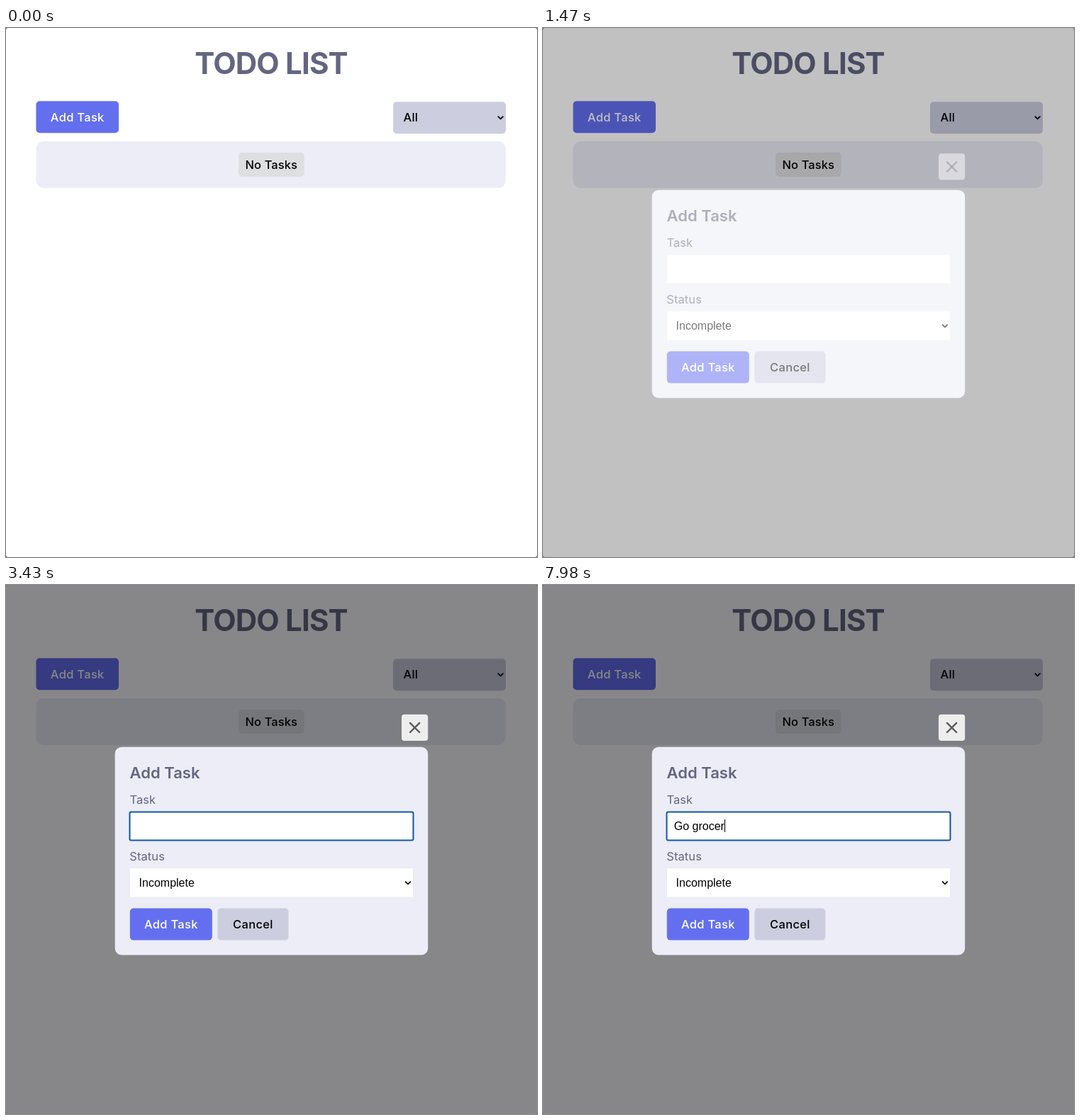
These frames come from a looping animation (749x747 px, 8 s). An HTML page with a canvas:

```html
<!DOCTYPE html>
<html lang="en">
<head>
<meta charset="utf-8">
<title>Todo list</title>
<style>
  html, body { margin: 0; width: 100%; height: 100%; overflow: hidden; background: #fff; }
  canvas { display: block; }
</style>
</head>
<body>
<canvas id="stage" width="749" height="747"></canvas>
<script>
const W = 749, H = 747, LOOP = 8000, STEP = 70;
const UI = 'Inter, "Noto Sans", sans-serif';
const FIELD = '"Liberation Sans", Arial, sans-serif';
const PURPLE = '#646ff0', SLATE = '#646681', PANEL = '#ecedf6', LILAC = '#cccdde';

const OPEN = 1308, FOCUS = 2450, BLINK = 1050, CARET_ON = 560;
const KEYS = [
  [6440, 'G'], [6650, 'o'], [6860, ' '], [7070, 'g'], [7280, 'r'],
  [7560, 'o'], [7630, 'c'], [7840, 'e'], [7980, 'r']
];

const stage = document.getElementById('stage').getContext('2d');

function makeLayer() {
  const c = document.createElement('canvas');
  c.width = W;
  c.height = H;
  return c.getContext('2d');
}
const page = makeLayer(), modal = makeLayer();

function box(g, x, y, w, h, r, fill) {
  g.fillStyle = fill;
  g.beginPath();
  g.roundRect(x, y, w, h, r);
  g.fill();
}

function text(g, str, x, y, font, fill, align = 'left', spacing = 0) {
  g.font = font;
  g.letterSpacing = spacing + 'px';
  g.textAlign = align;
  g.fillStyle = fill;
  g.fillText(str, x, y);
}

function line(g, points, color, width) {
  g.strokeStyle = color;
  g.lineWidth = width;
  g.lineCap = g.lineJoin = 'round';
  g.beginPath();
  points.forEach(([x, y], i) => i ? g.lineTo(x, y) : g.moveTo(x, y));
  g.stroke();
}

function chevron(g, x, y) {
  line(g, [[x - 3.3, y - 1.6], [x, y + 1.7], [x + 3.3, y - 1.6]], '#000', 1.8);
}

function button(g, label, x, y, w, fill, color) {
  box(g, x, y, w, 45, 5, fill);
  text(g, label, x + w / 2, y + 28.7, `500 16.5px ${UI}`, color, 'center', 0.3);
}

function drawPage(g) {
  g.fillStyle = '#fff';
  g.fillRect(0, 0, W, H);
  text(g, 'TODO LIST', 374, 65, `700 42px ${UI}`, SLATE, 'center', -0.8);
  button(g, 'Add Task', 42.4, 103.3, 116.6, PURPLE, '#fff');
  box(g, 546, 104.2, 159, 45, 5, LILAC);
  text(g, 'All', 560.5, 132, `500 16.5px ${UI}`, '#000', 'left', 0.2);
  chevron(g, 697.6, 126.7);
  box(g, 42.4, 160, 662.4, 66, 11, PANEL);
  box(g, 328, 176, 92.7, 34, 5, '#dedfe1');
  text(g, 'No Tasks', 374.3, 199, `500 16.5px ${UI}`, '#000', 'center', 0.1);
}

// Damped spring: stiffness 500, damping 25, mass 1
function spring(s) {
  const decay = 12.5, freq = Math.sqrt(500 - decay * decay);
  return Math.exp(-decay * s) * (Math.cos(freq * s) + decay / freq * Math.sin(freq * s));
}

function drawClose(g, t) {
  const y = 182.8 + 46 * spring((t - OPEN) / 1000);
  const cx = 576.6, cy = y + 18.6, d = 6.6;
  g.globalAlpha = Math.min(1, (t - OPEN) / 250);
  box(g, 558, y, 37.2, 37.2, 4, '#eee');
  line(g, [[cx - d, cy - d], [cx + d, cy + d]], '#585858', 2.4);
  line(g, [[cx + d, cy - d], [cx - d, cy + d]], '#585858', 2.4);
  g.globalAlpha = 1;
}

function drawField(g, t) {
  box(g, 175, 320.7, 399, 39.6, 0, '#fff');
  if (t < FOCUS) return;

  g.strokeStyle = '#1156a8';
  g.lineWidth = 2;
  g.beginPath();
  g.roundRect(174.5, 320.5, 400, 40, 2);
  g.stroke();

  const typed = KEYS.filter(([at]) => at <= t).map(([, ch]) => ch).join('');
  text(g, typed, 184.8, 345.7, `16px ${FIELD}`, '#000');
  if (typed || (t - FOCUS) % BLINK < CARET_ON) {
    const x = Math.round(185 + g.measureText(typed).width);
    g.fillStyle = '#000';
    g.fillRect(x, 331, 1, 18);
  }
}

function drawModal(g, t) {
  g.clearRect(0, 0, W, H);
  g.fillStyle = 'rgba(0, 0, 6, 0.47)';
  g.fillRect(0, 0, W, H);
  drawClose(g, t);
  box(g, 153.7, 228.8, 441.5, 293.8, 9.5, PANEL);
  text(g, 'Add Task', 174.6, 273, `600 22px ${UI}`, SLATE);
  text(g, 'Task', 174.6, 309, `400 16.5px ${UI}`, SLATE);
  drawField(g, t);
  text(g, 'Status', 174.2, 389, `400 16.5px ${UI}`, SLATE, 'left', 0.1);
  box(g, 175, 400.3, 399, 40.2, 0, '#fff');
  text(g, 'Incomplete', 187.6, 426, `16px ${FIELD}`, '#000');
  chevron(g, 567, 420.7);
  button(g, 'Add Task', 174.8, 456.6, 116, PURPLE, '#fff');
  button(g, 'Cancel', 298.4, 456.6, 100, LILAC, '#000');
}

function render(t) {
  stage.fillStyle = '#555';
  stage.fillRect(0, 0, W, H);
  stage.save();
  stage.beginPath();
  stage.roundRect(0, 0, W, H, 3);
  stage.clip();
  drawPage(page);
  stage.drawImage(page.canvas, 0, 0);
  if (t >= 1400) {
    const u = Math.min(1, (t - OPEN) / 400);
    drawModal(modal, t);
    stage.globalAlpha = 1 - Math.pow(1 - u, 1.4);
    stage.drawImage(modal.canvas, 0, 0);
  }
  stage.restore();
}

const start = performance.now();
function tick() {
  const t = (performance.now() - start) % LOOP;
  render(Math.floor(t / STEP) * STEP);
  requestAnimationFrame(tick);
}
tick();
</script>
</body>
</html>
```
